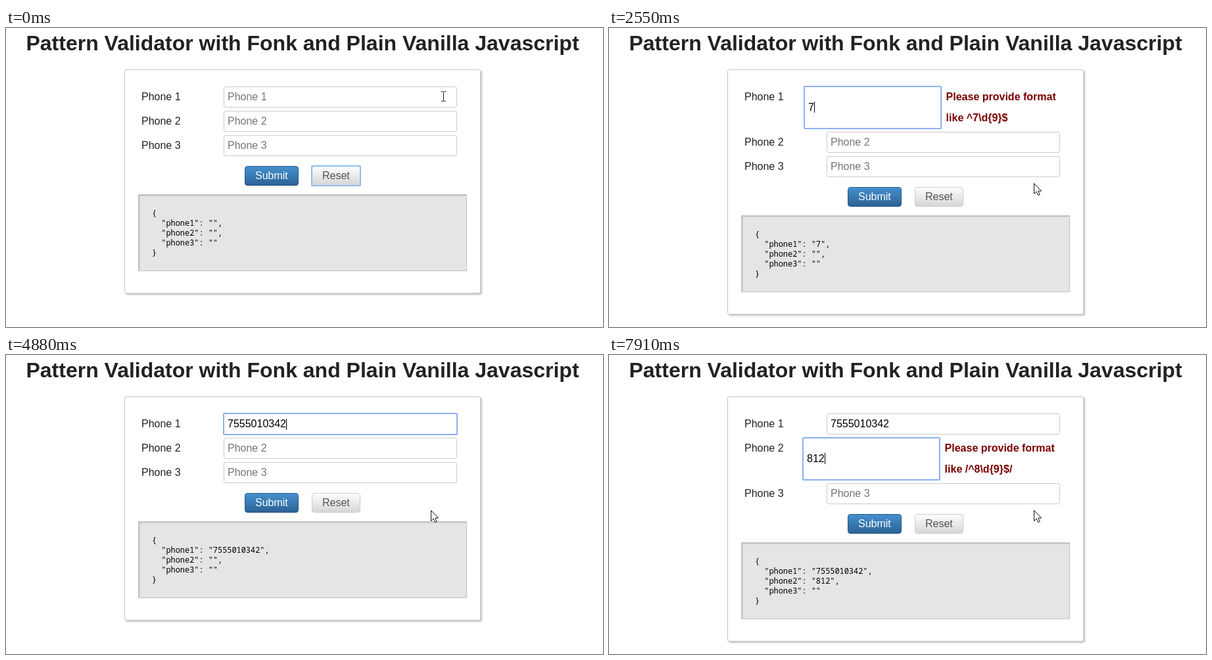
Animation of 908x455 px, one loop 8000 ms. Source, as an HTML page:

```html
<!DOCTYPE html>
<html lang="en">
<head>
<meta charset="utf-8">
<title>Pattern Validator</title>
<style>
  html, body { margin: 0; width: 100%; height: 100%; overflow: hidden; background: #fff; }
  #stage { position: relative; width: 908px; height: 455px; overflow: hidden; }
  #stage div, #stage svg { position: absolute; box-sizing: border-box; }
  #stage svg { left: 0; top: 0; }
  text { font: 16px "Liberation Sans", Arial, sans-serif; fill: #222; white-space: pre; }
  .title { font-size: 32px; font-weight: bold; text-anchor: middle; }
  .hint { fill: #757575; }
  .typed { fill: #000; }
  .error { font-weight: bold; fill: #7a0000; }
  .light { fill: #fff; }
  .dim { fill: #555; }
  .code { font: 11.92px "Noto Sans Mono", monospace; fill: #000; }
  .card { background: #fff; border: 1px solid #c6c6c6; border-radius: 3px; box-shadow: 2px 2px 3px rgba(0, 0, 0, .24); }
  .field { background: #fff; border: 1px solid #ccc; border-radius: 3px; }
  .focus { background: #fff; border: 2px solid #8cb0f0; border-radius: 2px; }
  .submit { background: linear-gradient(#4590ce, #2c6294); border: 1px solid #265a8a; border-radius: 4px; }
  .reset { background: linear-gradient(#fdfdfd, #d6d6d6); border: 1px solid #ccc; border-radius: 4px; }
  .ring { border: 2px solid #8fbeef; border-radius: 2px; }
  .output { background: #e5e5e5; border: 1px solid #c4c4c4; box-shadow: inset 1px 1px 2px #b4b4b4; }
</style>
</head>
<body>
<div id="stage"></div>
<script>
const LOOP = 8000;
const NUMBER = "7555010342";
const SECOND = "812";
const GROWTH = 32;
const DIGIT = 8.9;

// Rows: normal top edge, left edge when expanded, error hint
const ROWS = [
  { top: 89, wideX: 297, rule: "like ^7\\d{9}$" },
  { top: 126, wideX: 295, rule: "like /^8\\d{9}$/" },
  { top: 163 }
];

// Each step changes part of the state: typed lengths a and b, focus, caret, mouse step
const STEPS = [
  [0, { a: 0, b: 0, focus: "reset", caret: false, move: 0 }],
  [850, { focus: 0, caret: true }],
  [1080, { move: 1 }], [1160, { move: 2 }], [1240, { move: 3 }],
  [1310, { move: 4 }], [1390, { move: 5, caret: false }], [1470, { move: 6 }],
  [1850, { caret: true }],
  [2400, { caret: false }],
  [2550, { a: 1, caret: true }],
  [3030, { caret: false }],
  [3330, { a: 2, caret: true }],
  [3500, { a: 3 }], [3640, { a: 4 }], [4020, { a: 5 }], [4100, { a: 6 }],
  [4250, { a: 7 }], [4650, { a: 8 }], [4730, { a: 9 }], [4880, { a: 10 }],
  [5340, { caret: false }],
  [5800, { focus: 1, caret: true }],
  [6350, { caret: false }],
  [6750, { b: 1, caret: true }],
  [7280, { caret: false }],
  [7740, { b: 2, caret: true }],
  [7910, { b: 3 }]
];

const box = (kind, x, y, w, h) =>
  `<div class="${kind}" style="left:${x}px;top:${y}px;width:${w}px;height:${h}px"></div>`;
const text = (kind, x, y, words) => `<text class="${kind}" x="${x}" y="${y}">${words}</text>`;

function pointer(move) {
  const p = move / 6;
  const s = p * p * (3 - 2 * p);
  const x = Math.round(665 - 19 * s);
  const y = Math.round(104 + 132 * s);
  const shape = y < 195
    ? '<path d="M-3 -7.5H-1L.5 -6.5L2 -7.5H4M.5 -6.5V6.5M-3 7.5H-1L.5 6.5L2 7.5H4" fill="none" stroke="#222"/>'
    : '<path d="M.5 .5V16.5L4.2 13L6.6 18.5L9.2 17.4L6.8 12H11.6Z" fill="#fff" stroke="#111"/>';
  return `<g transform="translate(${x} ${y})">${shape}</g>`;
}

function view(state) {
  const values = [NUMBER.slice(0, state.a), SECOND.slice(0, state.b), ""];
  let boxes = "", marks = "", shift = 0;

  ROWS.forEach((row, i) => {
    const value = values[i];
    const active = state.focus === i;
    const wrong = value.length > 0 && value.length < 10;
    const y = row.top + shift;
    const x = wrong ? row.wideX : 331;
    const w = wrong ? 208 : 355;
    const h = wrong ? 64 : 32;
    const label = "Phone " + (i + 1);

    boxes += active ? box("focus", x - 1, y - 1, w + 1 + 1, h + 2) : box("field", x, y, w, h);
    marks += text("label", 206, y + 21, label);
    marks += text(value ? "typed" : "hint", x + 6, y + (wrong ? 37 : 21), value || label);
    if (active && state.caret) {
      const caretX = Math.round(x + 6 + DIGIT * value.length);
      marks += `<rect x="${caretX}" y="${y + (wrong ? 23 : 8)}" width="1" height="17"/>`;
    }
    if (wrong) {
      marks += text("error", x + 215.6, y + 21, "Please provide format");
      marks += text("error", x + 215.6, y + 53, row.rule);
      shift += GROWTH;
    }
  });

  boxes = box("card", 180, 63, 542, 341 + shift) + boxes
    + box("submit", 363, 210 + shift, 82, 30)
    + box("reset", 465, 210 + shift, 74, 30)
    + (state.focus === "reset" ? box("ring", 464, 209, 76, 32) : "")
    + box("output", 201, 253 + shift, 500, 117);

  const json = values.map((v, i) => `  "phone${i + 1}": "${v}"${i < 2 ? "," : ""}`);
  ["{", ...json, "}"].forEach((line, i) => {
    marks += text("code", 222, 286 + shift + 15 * i, line);
  });

  marks += text("title", 451, 34, "Pattern Validator with Fonk and Plain Vanilla Javascript")
    + text("light", 379, 230 + shift, "Submit")
    + text("dim", 481, 230 + shift, "Reset")
    + pointer(state.move);

  return `${boxes}<svg width="908" height="455">${marks}</svg>`;
}

const stage = document.getElementById("stage");
const start = performance.now();
let shown = -1;

function tick() {
  const time = (performance.now() - start) % LOOP;
  const past = STEPS.filter(([at]) => at <= time);
  if (past.length !== shown) {
    shown = past.length;
    stage.innerHTML = view(Object.assign({}, ...past.map(([, change]) => change)));
  }
  requestAnimationFrame(tick);
}
tick();
</script>
</body>
</html>
```
